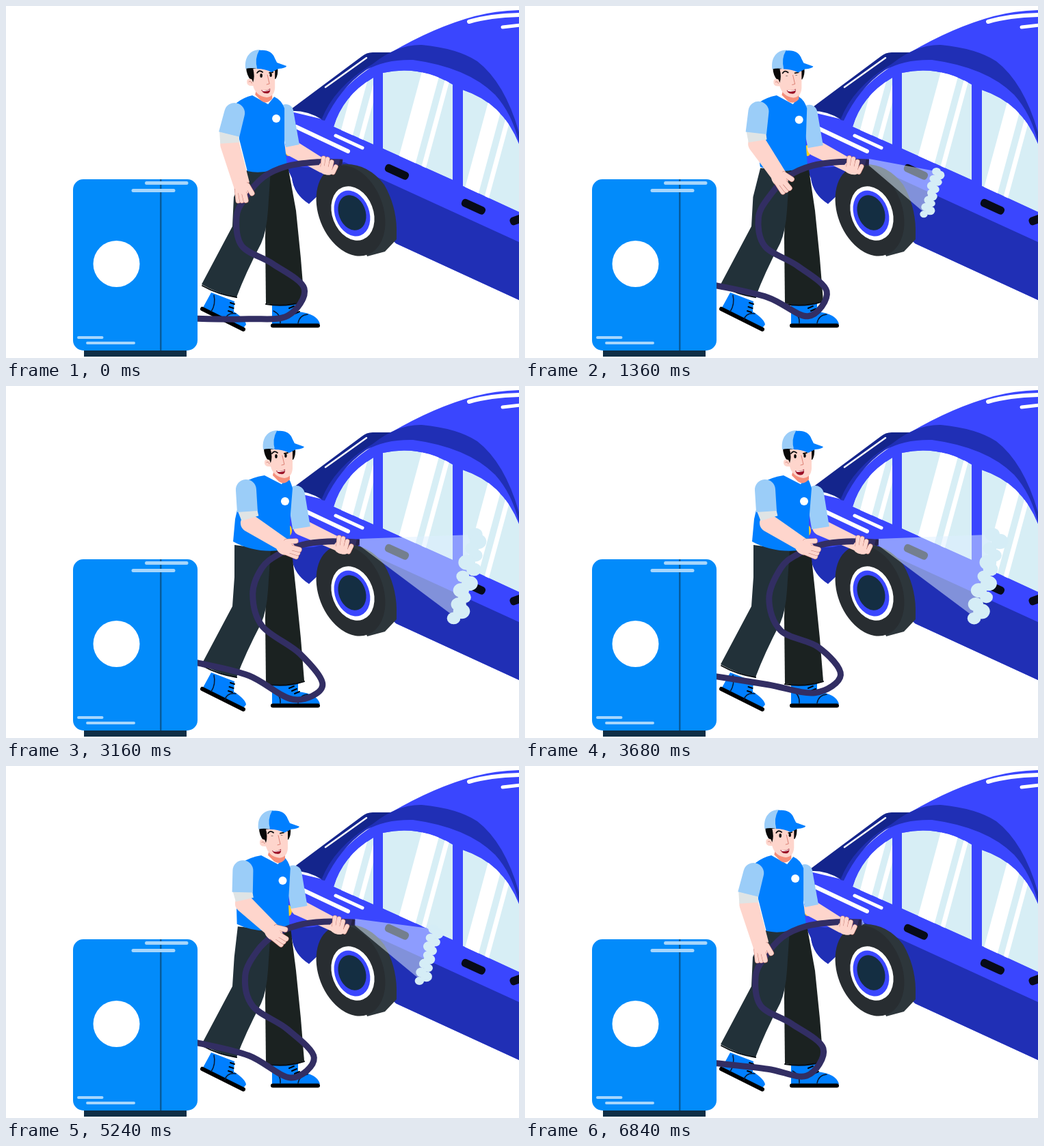
Animation, 750 px wide and 516 px high, one loop 6880 ms. Source, as an HTML page with a canvas:

```html
<!DOCTYPE html>
<html lang="en">
<head>
<meta charset="utf-8">
<title>Car wash</title>
<style>
html, body { margin: 0; width: 100%; height: 100%; overflow: hidden; background: #fff; }
canvas { display: block; width: 750px; height: 516px; }
</style>
</head>
<body>
<canvas id="stage" width="750" height="516"></canvas>
<script>
const ctx = document.getElementById('stage').getContext('2d');
const LOOP = 6880, STEP = 40, TAU = Math.PI * 2;
const BLUE = '#007fff', PALE = '#9bcdf8', SKIN = '#fed5cc', LINE = '#c4776f', HOSE = '#322e63', BLACK = '#090909';
const BODY = '#3a46fe', SHADE = '#202fb5', DEEP = '#14258c', GLASS = '#d7eef5', FOAM = '#d5edf6';

const lerp = (a, b, p) => a + (b - a) * p;
const mix = (a, b, p) => a.map((v, i) => lerp(v, b[i], p));

// everything that moves, as a function of time
function pose(t) {
  const u = t / LOOP;
  const lean = 1 - Math.abs(Math.cos(Math.PI * (u - .02))) ** 3.5;
  const wave = .5 + .5 * Math.cos(TAU * (t - 2200) / 2080);
  const sinceBlink = (t + 1550) % 1940 - 970;
  return {
    t, lean, wave,
    reach: Math.sin(Math.PI * u),
    mouth: .6 + .4 * wave * lean,
    eye: Math.min(1, Math.abs(sinceBlink) / 130),
    tip: 492 + 25 * lean
  };
}

function fill(d, color) {
  ctx.fillStyle = color;
  ctx.fill(new Path2D(d));
}

function stroke(d, color, width) {
  ctx.strokeStyle = color;
  ctx.lineWidth = width;
  ctx.stroke(new Path2D(d));
}

function oval(x, y, rx, ry, color, turn = 0) {
  ctx.fillStyle = color;
  ctx.beginPath();
  ctx.ellipse(x, y, rx, ry, turn, 0, TAU);
  ctx.fill();
}

function box(x, y, w, h, r, color) {
  ctx.fillStyle = color;
  ctx.beginPath();
  ctx.roundRect(x, y, w, h, r);
  ctx.fill();
}

// tapered limb with a round start and a flat end
function limb([x1, y1, r1, x2, y2, r2], color) {
  const a = Math.atan2(y2 - y1, x2 - x1) + Math.PI / 2;
  const c = Math.cos(a), s = Math.sin(a);
  ctx.fillStyle = color;
  ctx.beginPath();
  ctx.arc(x1, y1, r1, a, a + Math.PI);
  ctx.lineTo(x2 - c * r2, y2 - s * r2);
  ctx.lineTo(x2 + c * r2, y2 + s * r2);
  ctx.fill();
}

function spline(p) {
  const last = p.length / 2 - 1;
  const at = i => {
    i = Math.max(0, Math.min(last, i));
    return [p[2 * i], p[2 * i + 1]];
  };
  ctx.beginPath();
  ctx.moveTo(p[0], p[1]);
  for (let i = 0; i < last; i++) {
    const [a, b, c, d] = [-1, 0, 1, 2].map(k => at(i + k));
    ctx.bezierCurveTo(b[0] + (c[0] - a[0]) / 6, b[1] + (c[1] - a[1]) / 6,
      c[0] - (d[0] - b[0]) / 6, c[1] - (d[1] - b[1]) / 6, c[0], c[1]);
  }
}

function handle(x, y, turn) {
  ctx.save();
  ctx.translate(x, y);
  ctx.rotate(turn);
  box(-18, -6, 37, 12, 5, '#070b18');
  ctx.restore();
}

// glass with one wide and one thin slanted reflection
function drawWindow(d, x, wide) {
  const glass = new Path2D(d);
  ctx.save();
  ctx.clip(glass);
  ctx.fillStyle = GLASS;
  ctx.fill(glass);
  ctx.transform(1, 0, -.27, 1, x, 100);
  ctx.fillStyle = '#fff';
  ctx.fillRect(0, -20, wide, 220);
  ctx.fillRect(wide + 10, -20, 7, 220);
  ctx.restore();
}

function drawCar() {
  fill('M413 154 L463 166 Q487 122 529 93 L563 68 Q626 31 685 15 Q715 7 750 6 V431 L570 348 L560 270 L480 232 L443 290 Q421 276 418 252 L406 225 Z', BODY);
  fill('M413 154 L520 74 Q527 68 536 68 H565 L530 91 Q485 122 463 167 Q440 152 413 154 Z', DEEP);
  fill('M461 167 Q480 118 536 85 Q572 56 608 57 Q660 62 689 81 Q729 112 750 185 V200 Q740 158 715 130 Q675 90 595 79 Q555 78 526 94 Q488 121 466 168 Z', SHADE);
  fill('M495 229 L750 346 V431 L570 348 L520 300 Z', SHADE);
  fill('M407 229 Q435 241 458 234 L495 229 L520 300 L456 278 L443 290 Q421 276 418 252 Z', SHADE);
  drawWindow('M479 177 Q492 132 537 105 V203 Z', 512, 19);
  drawWindow('M551 98 Q604 86 653 115 V255 L551 209 Z', 607, 27);
  drawWindow('M668 123 Q726 142 750 202 V302 L668 264 Z', 716, 22);
  stroke('M467 119 L527 76', '#fff', 2.5);
  stroke('M424 177 L500 213', '#fff', 6);
  stroke('M482 190 L521 208', '#fff', 5);
  stroke('M677 23 Q708 14 752 13', '#fff', 6);
  stroke('M726 31 L752 28', '#fff', 5);
  oval(413, 212, 5, 8, '#ffd21c');
  handle(571, 243, .43);
  handle(683, 294, .43);
  handle(754, 311, -.35);

  fill('M484 233 Q525 226 553 262 Q570 292 571 326 V342 L554 360 L528 367 Z', '#2d363b');
  oval(504, 300, 47, 69, '#282d31', -.37);
  oval(507, 304, 30, 41, '#fff', -.37);
  oval(506, 304, 25, 34.5, BODY, -.37);
  oval(506, 303, 19.5, 26.5, '#142e42', -.37);
}

function drawSpray({ tip, reach, t }) {
  const y = 229, bend = reach * (1 - reach);
  const top = [tip + 173 * reach, y - 12 * reach + 85 * bend];
  const low = [tip + 143 * reach, y + 112 * reach + 45 * bend];
  fill(`M${tip} ${y - 5} L${top} L${low} L${tip} ${y + 5} Z`, 'rgba(222,240,255,.51)');
  for (let i = 0; i < 13; i++) {
    const [x, fy] = mix(top, low, i / 12);
    const side = (i % 2 ? 6 : -4) + 2 * Math.sin(i * 2.4 + t / 210);
    const r = 11 + 1.5 * Math.sin(i * 1.9);
    oval(x + side * reach, fy, r * reach, r * .9 * reach, FOAM);
  }
}

function drawShoes() {
  fill('M300 420 L334 433 L333 448 Q350 459 351 467 L347 472 L288 442 Z', BLUE);
  stroke('M287 444 L347 474', '#000', 6);
  stroke('M304 424 Q307 437 300 448 M320 460 Q323 449 336 451', '#081a33', 1.5);
  fill('M389 436 H427 V448 Q455 451 459 466 H389 Z', BLUE);
  stroke('M390 468.5 H456', '#000', 6);
  stroke('M391 447 Q402 452 401 465 M427 465 Q429 453 441 452', '#081a33', 1.5);
  for (let i = 0; i < 3; i++) {
    stroke(`M${328 - i * 1.5} ${435 + i * 6} l6 2 M${414 + i * 4} ${443 + i * 4} l7 -3`, '#000', 2);
  }
}

function drawLegs(p) {
  const waist = 352 - 18 * p, hip = 333 + p, seat = 241 - 8 * p;
  fill(`M382 236 L${412 + 5 * p} 234 L424 300 L431 370 L436 432 Q410 442 380 436 L379 340 Z`, '#1b2221');
  fill(`M${waist} ${seat} L387 240 L383 300 Q381 330 373 348 Q350 392 337 427 Q310 422 286 408 L331 323 L${hip} 280 Z`, '#223139');
  stroke('M287 410 Q310 423 337 427 M380 437 Q408 442 436 433', '#080d10', 2);
}

function drawVest(p) {
  fill(`M${360 + 18 * p} 131 Q${347 + 12 * p} 134 ${337 + 10 * p} 142 L${341 - 6 * p} 195
    L${353 - 21 * p} ${242 - 14 * p} Q${378 - 10 * p} 248 ${411 + 5 * p} ${233 + 6 * p}
    L${407 + 8 * p} 200 L${407 + 12 * p} 150 Q${403 + 13 * p} 138 ${392 + 19 * p} 133 L${383 + 20 * p} 144 Z`, BLUE);
}

function drawHead({ lean, mouth, eye }) {
  ctx.save();
  ctx.translate(26 * lean, lean);
  fill('M366 122 L389 127 V136 Q381 145 373 139 L364 130 Z', '#f58f7b');
  fill('M351 90 H397 Q398 101 394 107 L358 109 Q351 101 351 90 Z', BLACK);
  fill('M361 92 Q374 90 393 95 L393 120 Q392 133 381 134 Q365 132 361 117 Q351 118 352 110 Q353 104 361 108 Z', SKIN);
  fill('M361 92 Q364 103 361 112 L358 104 Z', BLACK);
  stroke('M355 111 Q358 109 359 113', LINE, .8);

  // the face turns a little against the head
  ctx.save();
  ctx.translate(-4 * lean, 0);
  stroke('M367 98 Q370 93 375 97 M385 98 L390 97', '#111', 1.8);
  oval(373, 102, 1.8, 2.7 * eye + .3, BLACK);
  oval(387, 101, 1.7, 2.7 * eye + .3, BLACK);
  stroke('M382 101 L385 114 L381 115', '#dc8074', 1);
  const drop = 124 + 10 * mouth;
  fill(`M373 123 Q381 125 386 121 Q387 ${drop - 1} 380 ${drop - 2} Q375 ${drop - 2} 373 123 Z`, '#9b1027');
  stroke('M375 124 Q381 125 385 123', '#fff', 1.3);
  ctx.restore();

  fill('M350 92 Q348 76 358 68 Q363 64 372 64 Q364 77 367 92 Q358 90 350 92 Z', PALE);
  fill('M367 92 Q363 77 370 65 Q388 63 393 77 L396 83 L410 88 Q409 91 398 92 L388 97 Q378 92 367 92 Z', BLUE);
  ctx.restore();
}

function drawPerson(now) {
  const p = now.lean;
  const arm = (rest, out, color) => limb(mix(rest, out, p), color);
  drawShoes();
  drawLegs(p);
  arm([419, 209, 12, 465, 236, 10], [432, 207, 12, 488, 233, 10], SKIN);
  arm([409, 155, 11, 419, 205, 10], [424, 159, 13, 432, 208, 13], PALE);
  drawVest(p);
  drawHead(now);
  oval(lerp(395, 408, p), lerp(165, 169, p), 6, 6, '#fff');
  arm([327, 203, 14, 344, 262, 12], [356, 201, 13, 408, 234, 10], SKIN);
  arm([326, 185, 14, 327, 201, 14], [353, 181, 14, 357, 194, 13], '#dfe4e5');
  arm([334, 157, 15, 326, 188, 15.5], [351, 152, 15, 353, 184, 15], PALE);
}

function finger(d, w) {
  stroke(d, LINE, w + 1);
  stroke(d, SKIN, w);
}

// the lower hose swings between two bends and reaches out with the lean
function drawHose({ lean, wave, tip }) {
  const rest = [412, 454, 436, 414, 390, 378, 345, 352, 337, 310];
  const slack = [430, 433, 459, 397, 428, 367, 372, 369, 350, 323];
  const tight = [420, 460, 463, 440, 430, 393, 375, 352, 361, 305];
  const outlet = lerp(405, 460, wave);
  const low = mix(rest, mix(tight, slack, wave), lean * lean);
  const high = mix([349, 282, 376, 251, 410, 235, 452, 229], [374, 267, 398, 247, 432, 233, 470, 228], lean);
  spline([265, outlet - 2, 280, outlet, 355, lerp(424, 460, wave), ...low, ...high, tip, 229]);
  ctx.lineCap = 'butt';
  ctx.strokeStyle = HOSE;
  ctx.lineWidth = 9;
  ctx.stroke();
  stroke(`M${tip - 5} 229 L${tip - 1} 230`, '#252247', 9);
  ctx.lineCap = 'round';
}

function drawHands(p) {
  ctx.save();
  ctx.translate(lerp(344, 410, p), lerp(267, 237, p));
  ctx.rotate(lerp(1.35, .25, p));
  oval(-1, 0, 14, 11, SKIN);
  finger('M-2 -9 L11 -13', 7);
  for (let i = 0; i < 3; i++) finger(`M2 ${7 - 4.5 * i} L${17 + i} ${9 - 5.5 * i}`, 7);
  oval(-2, 0, 11, 10, SKIN);
  ctx.restore();

  ctx.save();
  ctx.translate(23 * p, -p);
  oval(467, 238, 11, 9, SKIN, .4);
  for (let i = 0; i < 4; i++) finger(`M${463 + 5 * i} ${235 + 3 * i} L${464 + 6 * i} ${223 + i * i * 1.4}`, 6);
  oval(468, 241, 10, 6, SKIN, .4);
  ctx.restore();
}

function drawMachine() {
  box(114, 503, 150, 11, 0, '#112f46');
  box(98, 254, 182, 251, 15, '#028bfa');
  box(225, 254, 2.5, 251, 0, '#075b9c');
  stroke('M205.5 259.5 H264 M186 270.5 H245', '#a6d6fc', 5);
  stroke('M106 486 H140.5 M119 494 H187', '#a6d6fc', 4);
  oval(161.5, 378, 34, 34, '#fff');
}

function draw(t) {
  const now = pose(t);
  ctx.lineCap = ctx.lineJoin = 'round';
  box(0, 0, 750, 516, 0, '#fff');
  drawCar();
  drawSpray(now);
  drawPerson(now);
  drawHose(now);
  drawHands(now.lean);
  drawMachine();
}

const start = performance.now();
function tick() {
  const t = (performance.now() - start) % LOOP;
  draw(Math.floor(t / STEP) * STEP);
  requestAnimationFrame(tick);
}
tick();
</script>
</body>
</html>
```
